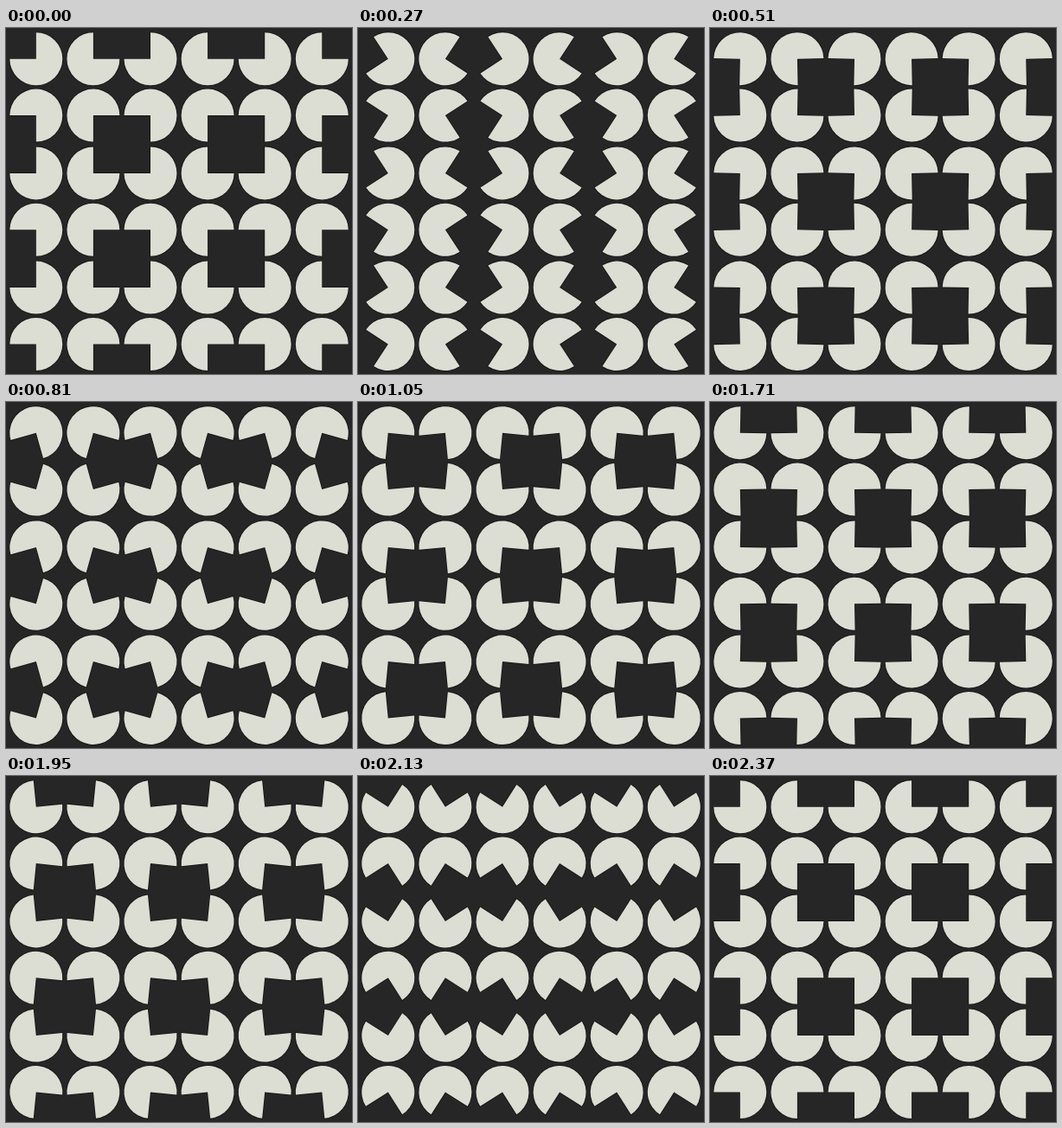
Recreate the animation shown at these times as an HTML page without scripts. Size 400x400 px, loop 2400 ms.

```html
<!DOCTYPE html>
<html lang="en">
<head>
<meta charset="utf-8">
<title>Turning notched discs</title>
<style>
  @property --turn {
    syntax: "<angle>";
    inherits: true;
    initial-value: 0deg;
  }
  html, body { margin: 0; width: 100%; height: 100%; overflow: hidden; background: #262626; }

  /* One clock on the stage; every disc inherits its angle. */
  svg {
    display: block;
    width: 100%;
    height: 100%;
    animation: turn 2400ms cubic-bezier(.3333, 0, .6667, 0) infinite;
  }
  .disc {
    fill: #dcddd3;
    stroke: #141414;
    stroke-width: 1.6;
    stroke-linejoin: round;
    paint-order: stroke;
    transform-origin: 0 0;
    transform: rotate(var(--turn));
  }

  /* Four quarter turns, each a cubic ease in and out. */
  @keyframes turn {
    0%    { --turn: 0deg; }
    12.5% { --turn: -45deg; animation-timing-function: cubic-bezier(.3333, 1, .6667, 1); }
    25%   { --turn: -90deg; }
    37.5% { --turn: -135deg; animation-timing-function: cubic-bezier(.3333, 1, .6667, 1); }
    50%   { --turn: -180deg; }
    62.5% { --turn: -225deg; animation-timing-function: cubic-bezier(.3333, 1, .6667, 1); }
    75%   { --turn: -270deg; }
    87.5% { --turn: -315deg; animation-timing-function: cubic-bezier(.3333, 1, .6667, 1); }
    100%  { --turn: -360deg; }
  }
</style>
</head>
<body>
<svg viewBox="0 0 400 400">
  <defs>
    <path id="disc" class="disc" d="M0 0V-30.5A30.5 30.5 0 1 1 -30.5 0Z"/>
    <!-- Four discs mirrored about the middle of the group -->
    <g id="pair">
      <use href="#disc" transform="translate(-33.05 -32.7)"/>
      <use href="#disc" transform="translate(33.05 -32.7) scale(-1 1)"/>
    </g>
    <g id="quad">
      <use href="#pair"/>
      <use href="#pair" transform="scale(1 -1)"/>
    </g>
    <g id="row">
      <use href="#quad" x="67.85"/>
      <use href="#quad" x="200.05"/>
      <use href="#quad" x="332.25"/>
    </g>
  </defs>
  <use href="#row" y="68.4"/>
  <use href="#row" y="200.6"/>
  <use href="#row" y="332.8"/>
</svg>
</body>
</html>
```
